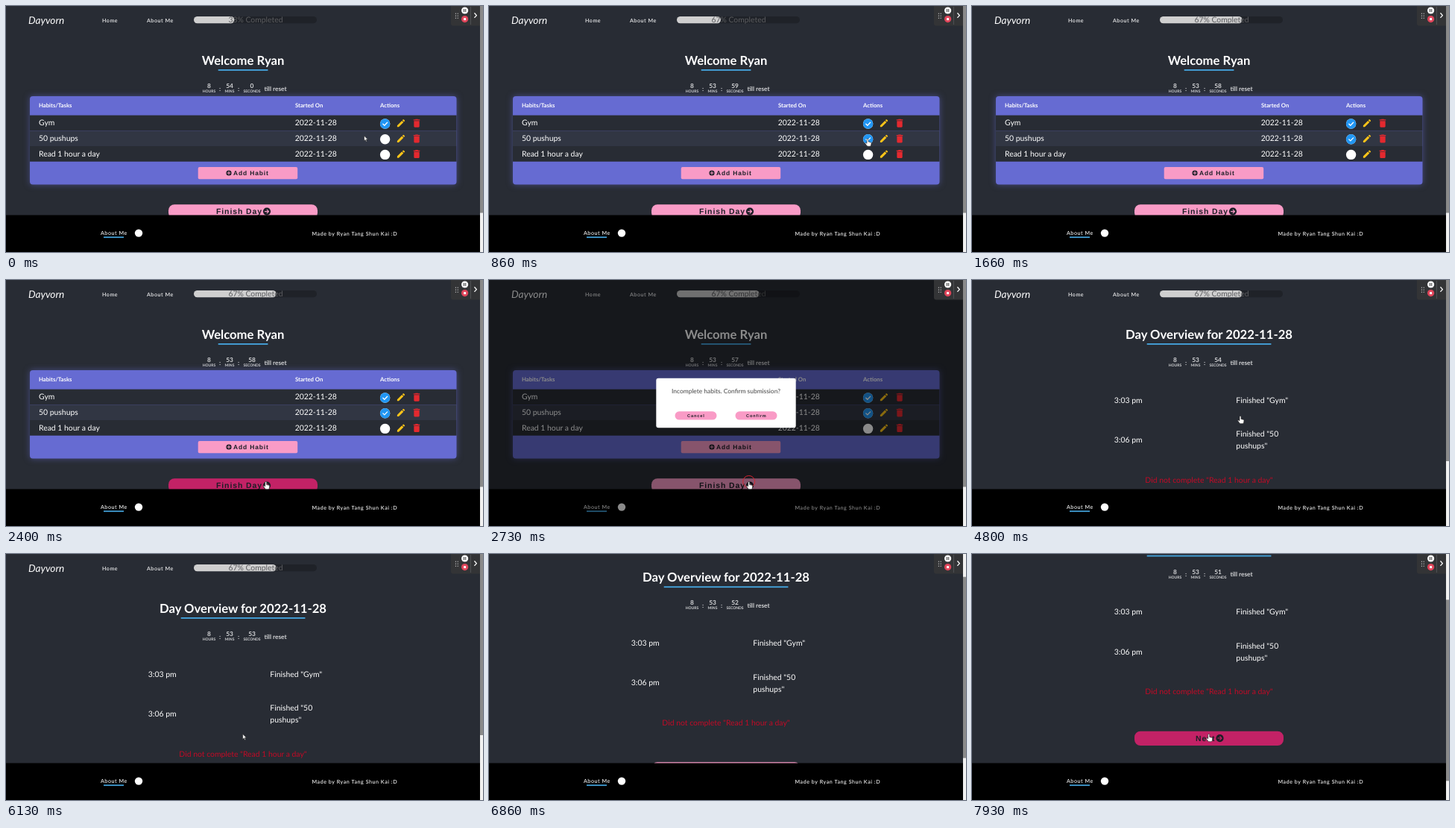
Recreate the animation shown at these times as an HTML page. Size 640x330 px, loop 8000 ms.

```html
<!DOCTYPE html>
<html lang="en">
<head>
<meta charset="utf-8">
<title>Habit tracker</title>
<style>
html, body { margin: 0; width: 100%; height: 100%; overflow: hidden; background: #282c34; }
svg { display: block; width: 100vw; height: 100vh; font-family: Lato, sans-serif; fill: #fff; text-rendering: geometricPrecision; }
.nav { font-size: 7.1px; letter-spacing: .55px; font-weight: 500; }
.title { font-size: 16.67px; font-weight: 700; text-anchor: middle; }
.cell { font-size: 10.42px; }
.head { font-size: 7.7px; font-weight: 700; }
.time { font-size: 8.33px; font-weight: 700; fill: #d4d5d7; }
.unit { font-size: 5px; font-weight: 700; fill: #d4d5d7; }
.mid { text-anchor: middle; }
.btn { font-family: "Liberation Sans", Arial, sans-serif; font-weight: 700; fill: #1c1e26; }
.big { font-size: 10.42px; letter-spacing: .93px; }
.add { font-size: 8.4px; letter-spacing: .9px; }
.small { font-size: 5.55px; letter-spacing: .9px; }
.line { fill: #45a6e0; }
.pink { fill: #f99bc6; }
.glow { filter: drop-shadow(0 0 4px #666bd280); }
.stroke { fill: none; stroke-linecap: round; stroke-linejoin: round; }
</style>
</head>
<body>
<svg viewBox="0 0 640 330" preserveAspectRatio="none">
  <rect width="640" height="330" fill="#282c34"/>
  <g id="page">
    <text x="30" y="24" font-size="13.6" font-style="italic">Dayvorn</text>
    <text class="nav" x="129" y="22.2">Home</text>
    <text class="nav" x="189" y="22.2">About Me</text>
    <rect x="252" y="14" width="165" height="9.3" rx="4.6" fill="#1f2228"/>
    <rect id="bar" x="252" y="14" height="9.3" rx="4.6" fill="#cfcfcf"/>
    <text id="percent" class="mid" x="335" y="22.3" font-size="10.4" fill="#5c5d60"></text>

    <g id="clock">
      <text id="hours" class="time mid" x="272.5" y="110">8</text>
      <text class="unit mid" x="272.5" y="116">HOURS</text>
      <text class="time mid" x="287" y="113.5">:</text>
      <text id="mins" class="time mid" x="300" y="110"></text>
      <text class="unit mid" x="300" y="116">MINS</text>
      <text class="time mid" x="312" y="113.5">:</text>
      <text id="secs" class="time mid" x="330" y="110"></text>
      <text class="unit mid" x="330" y="116">SECONDS</text>
      <text class="time" x="346.5" y="113.5">till reset</text>
    </g>

    <g id="home">
      <text class="title" x="318" y="78.5">Welcome Ryan</text>
      <rect class="line" x="284.7" y="85" width="66.7" height="1.8"/>
      <rect class="glow" x="32" y="121" width="572.5" height="118.5" rx="4" fill="#666bd2"/>
      <text class="head" x="44" y="136.3">Habits/Tasks</text>
      <text class="head" x="388" y="136.3">Started On</text>
      <text class="head" x="502" y="136.3">Actions</text>
      <g id="rows"></g>
      <rect class="pink" x="257.7" y="216" width="133.5" height="16.2" rx="2"/>
      <circle cx="299" cy="224" r="3.6" fill="#1c1e26"/>
      <path class="stroke" d="M297 224h4m-2-2v4" stroke="#f99bc6"/>
      <text class="btn add" x="305" y="227">Add Habit</text>
      <g id="finish"></g>
    </g>

    <g id="day">
      <text class="title" x="318" y="78.5">Day Overview for 2022-11-28</text>
      <rect class="line" x="234.7" y="85" width="166.7" height="1.8"/>
      <g class="cell">
        <text x="190.8" y="164.6">3:03 pm</text>
        <text x="354.3" y="164.6">Finished "Gym"</text>
        <text x="190.8" y="218">3:06 pm</text>
        <text x="354.3" y="210.3">Finished "50</text>
        <text x="354.3" y="226.2">pushups"</text>
        <text class="mid" x="318" y="271.7" fill="#c20a26">Did not complete "Read 1 hour a day"</text>
      </g>
      <g id="next"></g>
    </g>
  </g>

  <rect y="280.5" width="636" height="49.5" fill="#000"/>
  <text class="nav" x="127" y="307">About Me</text>
  <rect class="line" x="131" y="309.4" width="27" height="1.7"/>
  <circle cx="178" cy="304.6" r="5.2"/>
  <text class="nav" x="410.5" y="308.3" font-weight="700">Made by Ryan Tang Shun Kai :D</text>

  <g id="modal">
    <rect width="636" height="330" fill="#000" opacity=".46"/>
    <rect x="224.3" y="131.7" width="187.4" height="66.5" rx="3"/>
    <text class="mid" x="318" y="151.6" font-size="8.42" fill="#444">Incomplete habits. Confirm submission?</text>
    <rect class="pink" x="249.5" y="176.3" width="56" height="11.3" rx="5.6"/>
    <rect id="confirm" x="330.5" y="176.3" width="56" height="11.3" rx="5.6"/>
    <text class="btn small" x="266" y="184">Cancel</text>
    <text class="btn small" x="345" y="184">Confirm</text>
  </g>

  <rect x="636" width="4" height="330" fill="#f1f1f1"/>
  <rect id="thumb" x="636" width="4" fill="#8a8a8a"/>

  <path d="M597 0h39v26.5h-36q-3 0-3-3z" fill="#333436"/>
  <path class="stroke" d="M603.4 10.2h0m0 3h0m0 3h0m2.8-6h0m0 3h0m0 3h0" stroke="#ddd" stroke-width="1.2"/>
  <circle cx="615.6" cy="6" r="4.6"/>
  <path class="stroke" d="M614.5 4.4v3.2m2.2-3.2v3.2" stroke="#333"/>
  <circle cx="615.6" cy="17.6" r="4.6" fill="#e0455a"/>
  <rect x="614.1" y="16.1" width="3" height="3"/>
  <path d="M623.4 1v24" stroke="#5a5b5e" stroke-width=".8"/>
  <path class="stroke" d="M628.8 9.8l2.6 2.8-2.6 2.8" stroke="#fff" stroke-width="1.3"/>

  <circle id="ring" r="8" fill="none" stroke="#d8232f"/>
  <g id="cursor" stroke="#222" stroke-width=".6" stroke-linejoin="round">
    <path id="arrow" d="M0 0v7l1.6-1.5 1.1 2.4 1.1-.5-1.1-2.3h2.2z"/>
    <path id="hand" d="M-1 1a1 1 0 012 0v3l3 .8q1.1.3 1 1.4l-.5 2.9q-.2 1.1-1.2 1.1h-3q-.8 0-1.3-.7l-2.6-3.5q.8-1.1 2.6.3z"/>
  </g>
</svg>
<script>
const LOOP = 8000, PINK = '#f99bc6', HOVER = '#c32266';
const CHECK = 800, OPEN = 2660, SUBMIT = 4400;
const TICKS = [660, 1640, 2680, 3690, SUBMIT, 4700, 5700, 6700, 7700];
const CLICKS = [620, 2560, 4270];
const HAND = [[480, 1050], [2050, 2860], [4050, 5260], [7260, LOOP]];
const HIDDEN = [[1600, 1730], [6800, 7000]];
const PATH = [[120, 480.5, 174], [540, 508, 178], [1000, 508, 178], [2200, 348.7, 270.5],
  [2800, 348.7, 270.5], [3500, 386, 160.5], [3700, 386, 160.5], [4160, 360, 182.5],
  [5150, 360, 182.5], [6000, 317.7, 241.5]];

const el = id => document.getElementById(id);
const set = (id, attrs) => { for (const k in attrs) el(id).setAttribute(k, attrs[k]); };
const show = (id, on) => { el(id).style.display = on ? '' : 'none'; };
const ramp = (t, a, b) => Math.min(1, Math.max(0, (t - a) / (b - a)));
const ease = p => p * p * (3 - 2 * p);
const within = (t, spans) => spans.some(([a, b]) => t >= a && t < b);

const pencil = 'M3 17.25V21h3.75L17.81 9.94l-3.75-3.75zM20.71 7.04a1 1 0 000-1.41l-2.34-2.34a1 1 0 00-1.41 0l-1.83 1.83 3.75 3.75z';
const bin = 'M6 19c0 1.1.9 2 2 2h8c1.1 0 2-.9 2-2V7H6zM19 4h-3.5l-1-1h-5l-1 1H5v2h14z';
const icon = (d, x, y, s, fill) =>
  `<path d="${d}" fill="${fill}" transform="translate(${x - 12 * s} ${y - 12 * s}) scale(${s})"/>`;

el('rows').innerHTML = ['Gym', '50 pushups', 'Read 1 hour a day'].map((name, i) => {
  const y = 146.6 + i * 20.7, cy = y + 11.4;
  return `<rect x="32" y="${y}" width="572.5" height="20.7" fill="${i % 2 ? '#313643' : '#282c34'}"/>
    <g class="cell"><text x="44" y="${y + 13.6}">${name}</text><text x="387.7" y="${y + 13.6}">2022-11-28</text></g>
    <circle cx="508.6" cy="${cy}" r="6.7"/>
    <g id="check${i}"><circle cx="508.6" cy="${cy}" r="6.7" fill="#2196f3"/>
    <path class="stroke" d="M505.8 ${cy + .2}l2 2 3.8-4" stroke="#fff" stroke-width="1.3"/></g>
    ${icon(pencil, 530, cy - .8, .57, '#fcc419')}${icon(bin, 551, cy - .8, .61, '#e4292f')}`;
}).join('');

function bigButton(id, y, label, x, iconX) {
  const cy = y + 9.4;
  el(id).innerHTML = `<rect id="${id}Box" x="218" y="${y}" width="200" height="19.4" rx="8"/>
    <text class="btn big" x="${x}" y="${cy + 3.6}">${label}</text>
    <circle cx="${iconX}" cy="${cy}" r="5.1" fill="#1c1e26"/>
    <path id="${id}Arrow" class="stroke" d="M${iconX - 2.6} ${cy}h5m-2.2-2.3l2.3 2.3-2.3 2.3" stroke-width="1.1"/>`;
}
bigButton('finish', 266.2, 'Finish Day', 282, 350);
bigButton('next', 321, 'Next', 300, 332.5);

function tint(id, hover) {
  const fill = hover ? HOVER : PINK;
  set(id + 'Box', { fill });
  set(id + 'Arrow', { stroke: fill });
}

function cursorAt(t) {
  const i = PATH.findIndex(p => p[0] > t);
  if (i === 0) return PATH[0].slice(1);
  if (i < 0) return PATH[PATH.length - 1].slice(1);
  const [a, x0, y0] = PATH[i - 1], [b, x1, y1] = PATH[i];
  const p = ease(ramp(t, a, b));
  return [x0 + (x1 - x0) * p, y0 + (y1 - y0) * p];
}

function draw(t) {
  const day = t >= SUBMIT, done = t >= CHECK;
  const scroll = 41.67 * (ease(ramp(t, 6220, 6420)) + ease(ramp(t, 7120, 7320)));
  set('page', { transform: `translate(0 ${-scroll})` });
  show('home', !day);
  show('day', day);
  show('check1', done);
  show('check2', false);
  show('modal', t >= OPEN && !day);

  set('bar', { width: 165 * (.33 + .34 * ease(ramp(t, CHECK, CHECK + 350))) });
  el('percent').textContent = (done ? 67 : 33) + '% Completed';

  const left = 54 * 60 - TICKS.filter(k => k <= t).length;
  el('mins').textContent = Math.floor(left / 60);
  el('secs').textContent = left % 60;

  tint('finish', t >= 2050 && t < OPEN);
  tint('next', t >= 7260);
  set('confirm', { fill: t >= 4050 ? HOVER : PINK });

  const size = day ? 243 : 277.5;
  set('thumb', { y: scroll * size / 330, height: size });

  const [x, y] = cursorAt(t), hand = within(t, HAND);
  set('cursor', { transform: `translate(${x} ${y})` });
  show('cursor', !within(t, HIDDEN));
  show('hand', hand);
  show('arrow', !hand);
  set('ring', { cx: x, cy: y });
  show('ring', CLICKS.some(c => t >= c && t < c + 240));
}

function loop(now) {
  draw(now % LOOP);
  requestAnimationFrame(loop);
}
draw(0);
requestAnimationFrame(loop);
</script>
</body>
</html>
```
